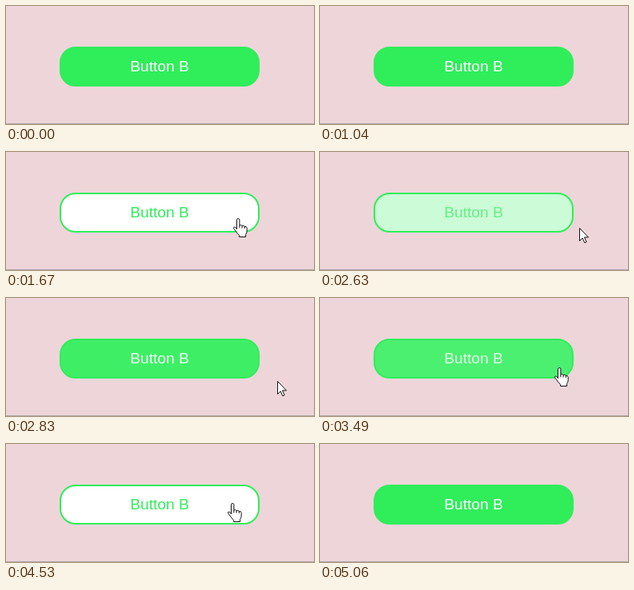
Recreate the animation shown at these times as an HTML page. Size 385 by 148 pixels, loop 5370 ms.

```html
<!DOCTYPE html>
<html lang="en">
<head>
<meta charset="utf-8">
<title>Button hover</title>
<style>
  html, body { margin: 0; height: 100%; overflow: hidden; background: #eed5d9; }
  svg { display: block; width: 100%; height: 100%; }
  text { font: 19.2px "Liberation Sans", Arial, sans-serif; text-anchor: middle; }
  .cursor { fill: #fff; stroke: #111; stroke-width: 1; stroke-linejoin: round; }
</style>
</head>
<body>
<svg viewBox="0 0 385 148">
  <rect y="147" width="385" height="1" fill="#b3a9ab"/>
  <rect id="button" x="68" y="52" width="248" height="48" rx="19" stroke="#2fee5a" stroke-width="2"/>
  <text id="label" x="192" y="82">Button B</text>
  <path id="arrow" class="cursor" d="M.5 .5V16.5l3.7-3.5 2.6 5.8 2.3-1-2.6-5.8H11.5z"/>
  <path id="hand" class="cursor" d="M-1.5 14V2.2a1.7 1.7 0 0 1 3.4 0V9q1.7-1.3 3.2.6 1.7-1 3.2.8 2.6-.5 2.9 2V16q0 2.4-1.6 4.5V23.5H1.6V21.5Q-1 19-3 16L-5.2 13.2q-.9-2 .9-2.2 1.4.2 2.8 2.5zM1.9 9v3.3M5.1 9.6v3M8.3 10.4v2.6"/>
</svg>
<script>
const LOOP = 5370, FADE = 400;
const GREEN = [47, 238, 90], WHITE = [255, 255, 255];
const hovers = [[1280, 2560], [3440, 4640]];

// Pointer path: time, x, y
const path = [
  [1040, 337, 148], [1280, 305, 96], [1350, 291, 84], [1560, 290, 83],
  [2450, 290, 83], [2560, 312, 91], [2630, 324, 95], [2900, 344, 107],
  [3340, 344, 107], [3440, 313, 93], [3490, 299, 87], [3800, 283, 74],
  [4530, 283, 74], [4640, 306, 95], [4960, 363, 149]
];

const $ = id => document.getElementById(id);
const clamp = v => Math.min(1, Math.max(0, v));
const mix = (a, b, k) => `rgb(${a.map((v, i) => Math.round(v + (b[i] - v) * k))})`;

// CSS "ease": cubic-bezier(.25, .1, .25, 1), solved by bisection
function ease(x) {
  if (x <= 0 || x >= 1) return clamp(x);
  const bezier = (a, b, u) => 3 * a * u * (1 - u) ** 2 + 3 * b * u * u * (1 - u) + u ** 3;
  let lo = 0, hi = 1;
  for (let i = 0; i < 20; i++) {
    const mid = (lo + hi) / 2;
    if (bezier(.25, .25, mid) < x) lo = mid; else hi = mid;
  }
  return bezier(.1, 1, lo);
}

function pointerAt(t) {
  const i = path.findIndex(p => p[0] > t);
  if (i < 1) return null;
  const [t0, x0, y0] = path[i - 1], [t1, x1, y1] = path[i];
  const k = (t - t0) / (t1 - t0);
  return [Math.round(x0 + (x1 - x0) * k), Math.round(y0 + (y1 - y0) * k)];
}

function draw(t) {
  const fade = hovers.reduce((sum, [enter, leave]) =>
    sum + ease((t - enter) / FADE) - ease((t - leave) / FADE), 0);
  $("button").setAttribute("fill", mix(GREEN, WHITE, fade));
  $("label").setAttribute("fill", mix(WHITE, GREEN, fade));

  const pos = pointerAt(t);
  const hovering = hovers.some(([enter, leave]) => t >= enter && t < leave);
  for (const [id, shown] of [["hand", hovering], ["arrow", !hovering]]) {
    $(id).setAttribute("visibility", pos && shown ? "visible" : "hidden");
    if (pos) $(id).setAttribute("transform", `translate(${pos})`);
  }
}

const start = performance.now();
function tick() {
  draw((performance.now() - start) % LOOP);
  requestAnimationFrame(tick);
}
tick();
</script>
</body>
</html>
```
